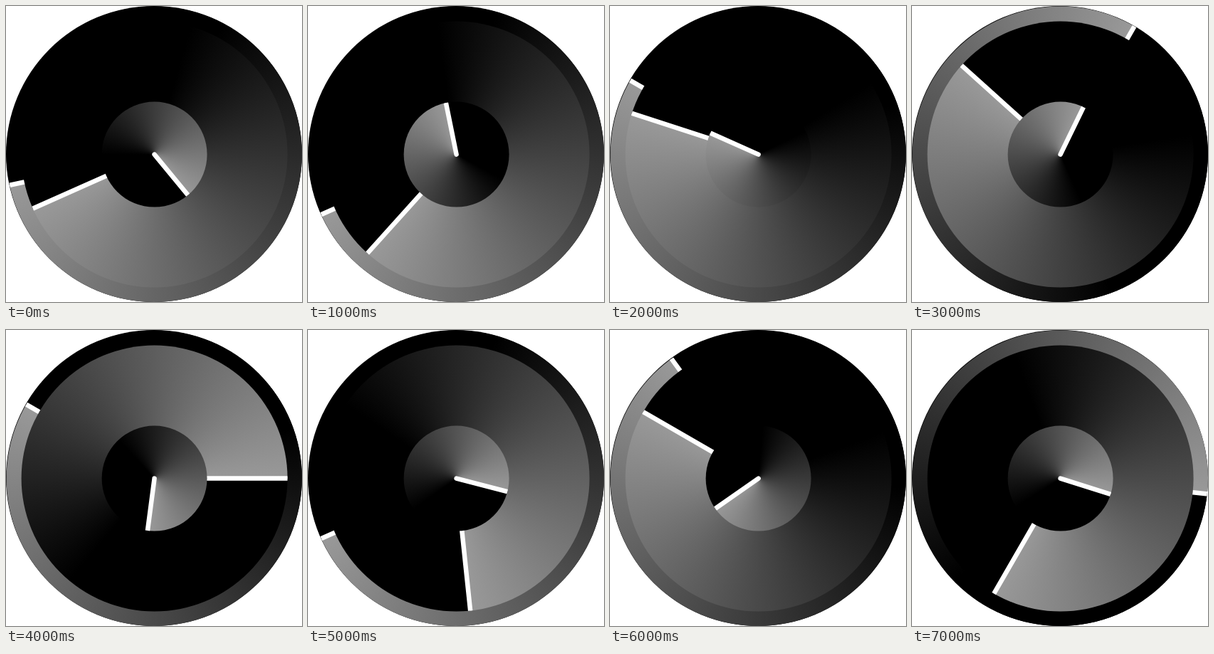
Write an HTML page with a canvas that moves like this. It is 416 by 416 pixels and loops after 8000 ms.

```html
<!DOCTYPE html>
<html>
<head>
<meta charset="utf-8">
<style>
  html, body { margin: 0; height: 100%; overflow: hidden; background: #fff; }
  canvas { display: block; border-radius: 50%; background: #000; }
</style>
</head>
<body>
<canvas width="416" height="416"></canvas>
<script>
const ctx = document.querySelector('canvas').getContext('2d');
const center = 208.6, turn = Math.PI * 2;
// The clock jumps to another time of day every second: [hour, minute, second]
const times = [
  [4, 41, 43], [11, 37, 41], [9, 48, 50], [0, 52, 5],
  [6, 15, 50], [3, 29, 41], [7, 50, 54], [3, 35, 16]
];

function drawDial(radius, fraction) {
  const angle = (fraction - 0.25) * turn;
  const shade = ctx.createConicGradient(angle, center, center);
  shade.addColorStop(0, '#000');
  shade.addColorStop(0.36, '#000');
  shade.addColorStop(1, '#999');

  ctx.save();
  ctx.beginPath();
  ctx.arc(center, center, radius, 0, turn);
  ctx.fillStyle = shade;
  ctx.fill();
  ctx.clip();

  ctx.beginPath();
  ctx.moveTo(center, center);
  ctx.lineTo(center + 220 * Math.cos(angle), center + 220 * Math.sin(angle));
  ctx.strokeStyle = '#fff';
  ctx.lineWidth = 6.5;
  ctx.lineCap = 'round';
  ctx.stroke();
  ctx.restore();
}

function frame() {
  const [hour, minute, second] = times[Math.floor(performance.now() / 1000) % times.length];
  ctx.clearRect(0, 0, 416, 416);
  drawDial(208, second / 60);
  drawDial(187, minute / 60);
  drawDial(74, (hour + minute / 60) / 12);
  requestAnimationFrame(frame);
}
frame();
</script>
</body>
</html>
```
